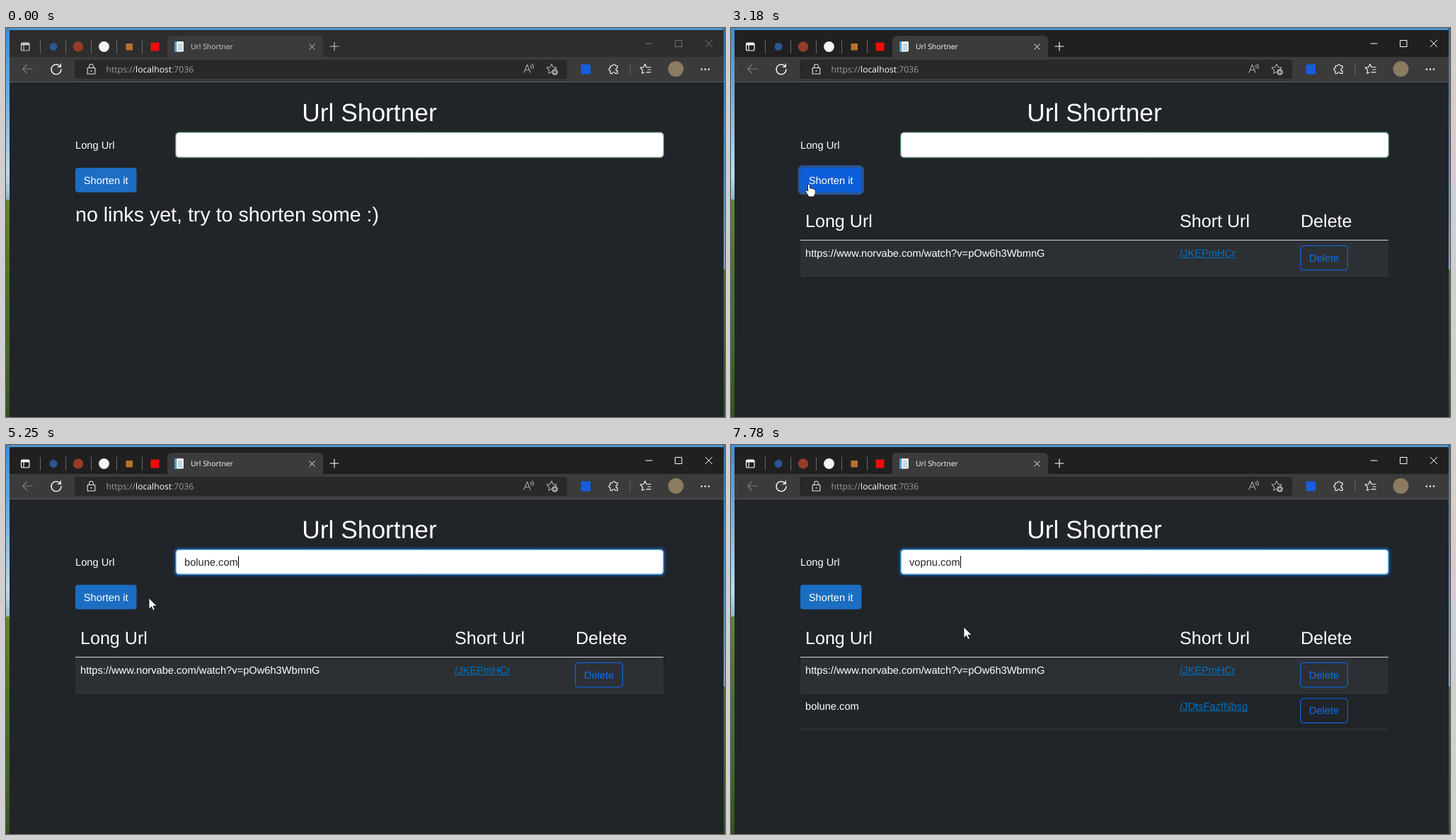
An HTML page with a canvas that plays this animation: 1016 by 551 pixels, repeating every 8 s.

```html
<!DOCTYPE html>
<html lang="en">
<head>
<meta charset="utf-8">
<title>Url Shortner</title>
<style>
  html, body { margin: 0; width: 100%; height: 100%; overflow: hidden; background: #212529; }
  canvas { display: block; width: 1016px; height: 551px; }
</style>
</head>
<body>
<canvas id="stage" width="1016" height="551"></canvas>
<script>
const ctx = document.getElementById('stage').getContext('2d', { alpha: false });
const LOOP = 8000, BLINK = 530;
const PAGE = '"Liberation Sans", Arial, sans-serif';
const UI = '"Open Sans", "Noto Sans", sans-serif';

const LONG = 'https://www.norvabe.com/watch?v=pOw6h3WbmnG';
const SITE = 'bolune.com';
const SITE2 = 'vopnu.com';
const SAVED = [
  SITE, SITE2,
  'https://mapnilir.bile.com/edit.aspx?resid=A4B70815C92DD6E3!5206&...',
  'https://www.trelpudan.com/sp/search?query=n%27+add+tablet+to+...',
  'https://bramblefiver.com/questions/38160925/labeltext-requires-a-...',
  'https://norvub.com/velnot/BrulHaTile.Docs/issues/25038'
];

// [start, end, value]
const FOCUS = [[1080, 3060, 'input'], [3060, 3860, 'button'], [3860, 5790, 'input'],
               [5790, 6390, 'button'], [6390, LOOP, 'input']];
const VALUE = [[2240, 3110, LONG], [4910, 5840, SITE], [7480, LOOP, SITE2]];
const MENU = [[1180, 2240], [3930, 4910], [6470, 7480]];
const CLICKS = [[1080, 1190], [3060, 3150], [3860, 3950], [4830, 4920],
                [5790, 5870], [6390, 6470], [7400, 7480]];
const CARET = [1080, 2240, 3860, 4910, 6390, 7480];
const ROWS = [[3110, LONG, '/JKEPmHCr'], [5840, SITE, '/JDtsFazfNbsg']];

// pointer stops: time, x, y
const PATH = [
  [420, 790, 532], [690, 331, 164], [950, 331, 164], [1060, 360, 181], [2540, 360, 181],
  [2720, 330, 432], [2920, 92, 224], [3010, 110, 221], [3230, 110, 221], [3340, 128, 214],
  [3720, 312, 170], [4220, 312, 170], [4430, 298, 234], [4940, 298, 234], [5250, 202, 217],
  [5400, 202, 217], [5450, 200, 216], [5650, 200, 216], [5770, 112, 219], [5890, 112, 219],
  [6160, 334, 177], [6480, 334, 177], [6720, 340, 226], [6930, 340, 226], [7160, 338, 238],
  [7230, 338, 238], [7320, 329, 258], [LOOP, 329, 258]
];

const active = (list, t) => list.find(s => t >= s[0] && t < s[1]);
const clamp = v => Math.max(0, Math.min(1, v));
const inside = (p, x, y, w, h) => p && p.x >= x && p.x < x + w && p.y >= y && p.y < y + h;

function pointerAt(t) {
  if (t < PATH[0][0]) return null;
  const i = Math.max(1, PATH.findIndex(p => p[0] > t));
  const [t0, x0, y0] = PATH[i - 1], [t1, x1, y1] = PATH[i];
  const k = clamp((t - t0) / (t1 - t0)), e = k * k * (3 - 2 * k);
  return { x: x0 + (x1 - x0) * e, y: y0 + (y1 - y0) * e };
}

function menuAlpha(t) {
  return Math.max(...MENU.map(([a, b]) =>
    Math.min(clamp((t - a) / 100), clamp((b + 90 - t) / 90))));
}

function rect(x, y, w, h, fill) {
  ctx.fillStyle = fill;
  ctx.fillRect(x, y, w, h);
}
function round(x, y, w, h, r, fill, line, lw = 1) {
  ctx.beginPath();
  ctx.roundRect(x, y, w, h, r);
  if (fill) { ctx.fillStyle = fill; ctx.fill(); }
  if (line) { ctx.strokeStyle = line; ctx.lineWidth = lw; ctx.stroke(); }
}
function dot(x, y, r, fill) {
  ctx.beginPath();
  ctx.arc(x, y, r, 0, 7);
  ctx.fillStyle = fill;
  ctx.fill();
}
function text(s, x, y, size, color, font = PAGE, weight = 400, align = 'left') {
  ctx.font = `${weight} ${size}px ${font}`;
  ctx.textRendering = 'geometricPrecision';
  ctx.textAlign = align;
  ctx.fillStyle = color;
  ctx.fillText(s, x, y);
  return ctx.measureText(s).width;
}
function icon(x, y, d, color, lw = 1.1, fill) {
  ctx.save();
  ctx.translate(x, y);
  const p = new Path2D(d);
  ctx.lineWidth = lw;
  ctx.lineCap = ctx.lineJoin = 'round';
  if (fill) { ctx.fillStyle = fill; ctx.fill(p); }
  if (color) { ctx.strokeStyle = color; ctx.stroke(p); }
  ctx.restore();
}
function fade(x, y, w, h, stops) {
  const g = ctx.createLinearGradient(0, y, 0, y + h);
  stops.forEach(([k, c]) => g.addColorStop(k, c));
  rect(x, y, w, h, g);
}
const cross = (x, y, r, color) => icon(x, y, `M${-r} ${-r}L${r} ${r}M${r} ${-r}L${-r} ${r}`, color, 1);

function desktop() {
  rect(0, 0, 1016, 4, '#4b93cf');
  fade(0, 0, 6, 243, [[0, '#3f8ccd'], [0.45, '#76b3e4'], [0.85, '#bcdcef'], [1, '#8fb8cf']]);
  fade(0, 243, 6, 308, [[0, '#64832f'], [0.35, '#507327'], [0.7, '#466626'], [1, '#374f20']]);
  fade(1013, 0, 3, 342, [[0, '#33709f'], [0.6, '#5590bb'], [1, '#7ba3bb']]);
  fade(1013, 342, 3, 209, [[0, '#4f6b2a'], [1, '#374f20']]);
}

function tabStrip(on) {
  const fg = on ? '#ffffff' : '#c9c9c9';
  rect(5, 3, 1009, 38, on ? '#202020' : '#2d2d2d');
  round(228, 11, 220, 34, [6, 6, 0, 0], '#3b3b3b');
  for (const x of [48, 84, 120, 156, 192]) rect(x, 17, 1, 19, '#696969');

  round(21.5, 21, 11.5, 11, 2, null, fg, 1.2);
  rect(21.5, 21, 11.5, 3.4, fg);
  rect(24.5, 23, 1.1, 8.5, fg);
  dot(67, 26.5, 5.5, '#2b5594');
  dot(102, 26.5, 7.2, '#963c29');
  dot(138.5, 26.5, 7.4, '#f4f4f4');
  rect(169.5, 22, 9.5, 9.5, '#b9722c');
  rect(204.5, 20.5, 12, 12, '#f00c0c');

  round(238, 19, 9, 15, 1, '#4d9ccb');
  round(241, 19, 10, 14.5, 1, '#e8f0f3');
  for (let i = 0; i < 4; i++) rect(243, 23 + i * 2.4, 6, 0.8, '#8eabb8');
  text('Url Shortner', 261, 30, 10.4, on ? '#fff' : '#d0d0d0', UI);
  cross(432.5, 26.5, 3.6, fg);
  icon(464, 26, 'M-6 0H6M0 -6V6', fg);

  const win = on ? '#ffffff' : '#777777';
  icon(908.5, 22, 'M-4.5 0H4.5', win, 1);
  icon(950.5, 22, 'M-4.5 -4.5H4.5V4.5H-4.5Z', win, 1);
  cross(993, 22, 4.7, win);
}

function toolbar() {
  rect(5, 41, 1009, 35, '#3b3b3b');
  rect(5, 76, 1009, 1, '#5b5b5b');
  round(97, 45, 696, 27, 4, '#292929');
  icon(30.5, 58, 'M7 0H-7M-1 -6L-7 0L-1 6', '#7d7d7d');
  icon(71, 58.5, 'M5.8 -3.8A7 7 0 1 0 7 0M6.3 -7.5V-3.4H2.2', '#fff', 1.3);
  icon(120.5, 59, 'M-5.3 -2.5H5.3V6H-5.3ZM-2.8 -2.5V-5A2.8 2.8 0 0 1 2.8 -5V-2.5', '#e8e8e8');
  dot(120.5, 60.7, 1, '#e8e8e8');
  let x = 141.5;
  x += text('https://', x, 63, 12.2, '#9c9c9c', UI);
  x += text('localhost', x, 63, 12.2, '#fff', UI);
  text(':7036', x, 63, 12.2, '#9c9c9c', UI);

  const star = 'M0 -7L2.1 -2.5L7 -1.9L3.4 1.5L4.3 6.3L0 4L-4.3 6.3L-3.4 1.5L-7 -1.9L-2.1 -2.5Z';
  icon(738, 58, 'M-6 5L-1.5 -6L3 5M-4.5 1.5H1.5M3 -5Q5 -3.5 4 -1M5 -7Q9 -4 6.4 -.3', '#a9a9a9');
  icon(771, 58, star, '#a9a9a9');
  dot(775.5, 62.5, 4.4, '#a9a9a9');
  icon(775.5, 62.5, 'M-2.2 0H2.2M0 -2.2V2.2', '#292929', 1);
  rect(812.5, 51.5, 13.5, 14, '#175ddc');
  icon(859, 58.5, 'M-5 -5H-1.8A2 2 0 0 1 2.2 -5H5V-1.8A2 2 0 0 0 5 2.2V6H2A2 2 0 0 0 -2 6H-5V2.2A2 2 0 0 1 -5 -1.8Z', '#f2f2f2', 1.2);
  rect(881.5, 51, 1, 15, '#696969');
  icon(903, 58, 'M-1 5L-4.3 6.3L-3.4 1.5L-7 -1.9L-2.1 -2.5L0 -7L2.1 -2.5H8M4 1H8M2 4.7H8', '#f2f2f2', 1.2);
  dot(946.5, 58, 11, '#8b7b5f');
  for (const d of [-5, 0, 5]) dot(988 + d, 58.5, 1.2, '#fff');
}

function form(t, focus, value, preview, p) {
  text('Url Shortner', 513.5, 132, 35.35, '#fff', PAGE, 400, 'center');
  text('Long Url', 98, 171, 14.67, '#fff');

  const typing = focus === 'input';
  if (typing) round(236.5, 144.5, 696, 42, 7, '#1c3760');
  // green validity outline around the field's own border
  round(239.6, 147.8, 689.8, 35.8, 4.5, null, typing ? '#2491a2' : '#4f9a68');
  round(240.4, 148.6, 688.2, 34.2, 4, preview ? '#e8f0fe' : '#fff', typing ? '#86b7fe' : '#ced4da');
  const shown = preview || value;
  const w = shown ? text(shown, 252, 171, preview ? 12.2 : 14.67, '#212529') : 0;
  const since = t - Math.max(...CARET.filter(c => c <= t), 0);
  if (typing && Math.floor(since / BLINK) % 2 === 0)
    rect(Math.round(252 + (preview ? 0 : w)), 157, 1, 17, '#000');

  const hot = focus === 'button' || inside(p, 98, 198, 86, 35);
  if (focus === 'button') round(94.6, 194.4, 93.3, 41.8, 7, '#295593');
  round(98, 198, 86.5, 34.7, 4, hot ? '#0b5ed7' : '#1b6ec2');
  text('Shorten it', 141.2, 220.5, 14.67, '#fff', PAGE, 400, 'center');
}

function table(rows) {
  if (!rows.length) {
    text('no links yet, try to shorten some :)', 98, 274, 28.6, '#fff');
    return;
  }
  text('Long Url', 105, 282, 25.1, '#fff');
  text('Short Url', 634, 282, 25.1, '#fff');
  text('Delete', 805, 282, 25.1, '#fff');
  rows.forEach(([, url, code], i) => {
    const y = 301 + i * 50.7;
    if (i % 2 === 0) rect(98, y, 831, 50, '#2c3034');
    rect(98, Math.round(y + 50), 831, 1, '#373b3e');
    text(url, 105, y + 23, 14.67, '#fff');
    const w = text(code, 634, y + 23, 14.67, '#0071c1');
    rect(634, Math.round(y + 24), w, 1, '#0071c1');
    round(804.7, y + 7.3, 66.6, 34.6, 4, null, '#0d6efd');
    text('Delete', 838, y + 29.7, 14.67, '#0d6efd', PAGE, 400, 'center');
  });
  rect(98, 300, 831, 1, '#d3d5d7');
}

function menu(alpha, hover) {
  if (!alpha) return;
  ctx.save();
  ctx.globalAlpha = alpha;
  round(239.5, 182, 367.5, 224, [0, 0, 3, 3], '#4a4a4a');
  text('Saved data', 253, 203, 9.7, '#c2c2c2', UI);
  cross(593.5, 199, 4, '#e6e6e6');
  SAVED.forEach((s, i) => {
    const y = 231 + i * 31.2, on = i === hover;
    if (on) {
      round(243, y - 16, 330, 31, 2, '#747474');
      icon(588, y - 0.5, 'M-6 -5H6M-2 -5V-7H2V-5M-4.7 -5L-4 7H4L4.7 -5M-1.5 -2V4M1.5 -2V4', '#b9b9b9', 1);
    }
    text(s, 251.5, y + 4, 10.5, '#fff', UI, on ? 600 : 400);
  });
  ctx.restore();
}

function pointer(p, t, overMenu) {
  if (!p) return;
  if (active(CLICKS, t)) dot(p.x + 1, p.y - 1, 11, 'rgba(222,205,24,.82)');
  if (!overMenu && inside(p, 240, 148, 689, 35)) {
    ctx.save();
    ctx.globalCompositeOperation = 'difference';
    icon(p.x, p.y, 'M-3.5 -7.5H-1L0 -6.7L1 -7.5H3.5M0 -6.7V6.7M-3.5 7.5H-1L0 6.7L1 7.5H3.5', '#fff', 1.3);
    ctx.restore();
  } else if (inside(p, 98, 198, 86, 35)) {
    icon(p.x, p.y, 'M-1.6 1.3Q0 -1.4 1.6 1.3V6.2Q3.3 5 4.4 6.8Q6.3 5.8 7 7.6Q9.2 7 9.3 9.2V12.5Q9 15 7.6 16.2V18H-.5Q-.8 16 -2.7 13.4L-4.9 10.3Q-5 7.7 -2.8 8.9L-1.6 10Z', '#111', 0.9, '#fff');
  } else {
    icon(p.x, p.y, 'M0 0V15.4L3.6 12L5.9 17.3L8.3 16.2L6 11.1H11Z', '#111', 0.8, '#fff');
  }
}

function draw(t) {
  const p = pointerAt(t), alpha = menuAlpha(t), open = active(MENU, t);
  const overMenu = !!open && inside(p, 240, 184, 367, 222);
  const hover = overMenu && p.y >= 215 ? Math.floor((p.y - 215) / 31.2) : -1;
  const focus = (active(FOCUS, t) || [])[2];
  const value = (active(VALUE, t) || [])[2] || '';

  desktop();
  rect(5, 3, 1009, 548, '#212529');
  tabStrip(t >= 1080);
  toolbar();
  form(t, focus, value, hover >= 0 ? SAVED[hover] : '', overMenu ? null : p);
  table(ROWS.filter(r => t >= r[0]));
  menu(alpha, hover);
  pointer(p, t, overMenu);
}

const start = performance.now();
function tick() {
  draw((performance.now() - start) % LOOP);
  requestAnimationFrame(tick);
}
tick();
</script>
</body>
</html>
```
